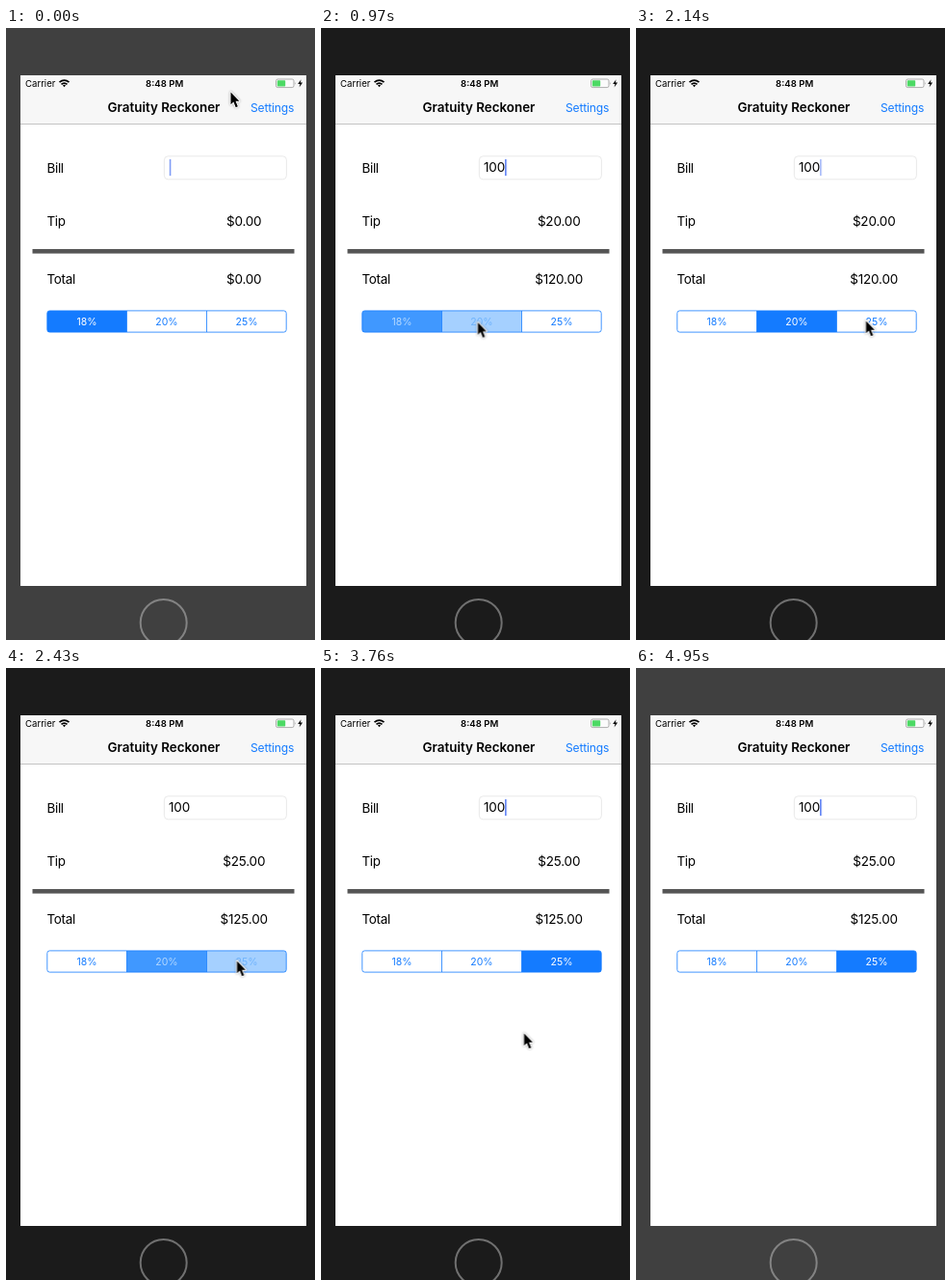
Animation, 321 px wide and 634 px high, one loop 5050 ms. Source, as an HTML page:

```html
<!DOCTYPE html>
<html lang="en">
<head>
<meta charset="utf-8">
<title>Tip calculator</title>
<style>
  html, body { margin: 0; width: 100%; height: 100%; overflow: hidden; background: #1b1b1b; }
  svg { display: block; width: 100vw; height: 100vh; }
  text { font-family: Inter, Roboto, sans-serif; font-size: 13.4px; letter-spacing: -.3px; fill: #000; }
  .mid { text-anchor: middle; }
  .title { font-size: 13.4px; font-weight: 600; letter-spacing: 0; }
  .status { font-size: 9.6px; letter-spacing: 0; }
  .clock { font-weight: 600; }
  .amount, .amounts text { font-size: 13.5px; letter-spacing: -.17px; }
  .link { font-size: 12.1px; letter-spacing: -.18px; fill: #147bff; }
  .segments text { font-size: 10.5px; letter-spacing: 0; fill: #147bff; }
  .segments rect { fill: transparent; }

  /* Every change is a hard step on one shared 5050 ms loop. */
  .anim, .segments rect, .segments text { animation: 5050ms step-end infinite; }

  .bezel { animation-name: bezel; }
  @keyframes bezel { 0%, 98.01% { fill: #404040 } 9.9% { fill: #1b1b1b } }
  .home { animation-name: home; }
  @keyframes home { 0%, 98.01% { stroke: #838383 } 9.9% { stroke: #707070 } }

  .bill { animation-name: bill; }
  @keyframes bill { 0% { opacity: 0 } 9.9% { opacity: 1 } }

  .sum0 { animation-name: sum0; }
  .sum18 { animation-name: sum18; }
  .sum20 { animation-name: sum20; }
  .sum25 { animation-name: sum25; }
  @keyframes sum0 { 0% { opacity: 1 } 9.9% { opacity: 0 } }
  @keyframes sum18 { 0%, 19.2% { opacity: 0 } 9.9% { opacity: 1 } }
  @keyframes sum20 { 0%, 48.11% { opacity: 0 } 19.2% { opacity: 1 } }
  @keyframes sum25 { 0% { opacity: 0 } 48.11% { opacity: 1 } }

  .segments .fill18 { animation-name: fill18; }
  .segments .fill20 { animation-name: fill20; }
  .segments .fill25 { animation-name: fill25; }
  @keyframes fill18 { 0% { fill: #147bff } 19.2% { fill: #4098ff } 21.78% { fill: #fff } }
  @keyframes fill20 {
    0%, 51.08% { fill: #fff }
    19.2% { fill: #a5d0ff }
    21.78% { fill: #147bff }
    48.11% { fill: #4098ff }
  }
  @keyframes fill25 {
    0% { fill: #fff }
    45.14% { fill: #dcebff }
    48.11% { fill: #a5d0ff }
    51.08% { fill: #147bff }
  }

  .segments .label18 { animation-name: label18; }
  .segments .label20 { animation-name: label20; }
  .segments .label25 { animation-name: label25; }
  @keyframes label18 { 0% { fill: #fff } 19.2% { fill: #b4d8ff } 21.78% { fill: #147bff } }
  @keyframes label20 {
    0%, 51.08% { fill: #147bff }
    19.2% { fill: #6fb3fc }
    21.78% { fill: #fff }
    48.11% { fill: #b4d8ff }
  }
  @keyframes label25 { 0% { fill: #147bff } 48.11% { fill: #6fb3fc } 51.08% { fill: #fff } }

  .caret { animation-name: caret-place; }
  @keyframes caret-place { 0% { transform: translate(169.8px, 136px) } 9.9% { transform: translate(191.2px, 136px) } }
  .blink { animation-name: blink; }
  @keyframes blink {
    0% { opacity: .75 }
    24.75%, 42.37%, 51.08%, 62.77%, 71.48%, 83.36% { opacity: .55 }
    9.9%, 27.72%, 45.14%, 65.74%, 86.13% { opacity: 0 }
    19.2%, 33.46%, 54.05%, 74.45%, 92.07% { opacity: 1 }
  }

  .pointer { animation-name: pointer; }
  @keyframes pointer {
    0% { transform: translate(233px, 66px) }
    9.9% { transform: translate(163.5px, 305px) }
    19.2% { transform: translate(162.5px, 304.5px) }
    36.43% { transform: translate(174px, 304.5px) }
    39.4% { transform: translate(220px, 304px) }
    42.37% { transform: translate(238.5px, 303px) }
    45.14% { transform: translate(239.5px, 303px) }
    68.71% { transform: translate(239px, 302.5px) }
    71.48% { transform: translate(236.5px, 304px) }
    74.45% { transform: translate(210.5px, 378px) }
    77.42% { transform: translate(184.5px, 540px) }
    80.39% { transform: translate(180.5px, 578px) }
    86.13% { transform: translate(215px, 598px) }
    89.1% { transform: translate(250px, 620px) }
    92.07% { transform: translate(400px, 700px) }
  }
</style>
</head>
<body>
<svg viewBox="0 0 321 634">
  <defs>
    <clipPath id="pill"><rect x="42.8" y="292.9" width="248.4" height="22.2" rx="2.6"/></clipPath>
  </defs>

  <rect class="anim bezel" width="321" height="634"/>
  <circle class="anim home" cx="163.7" cy="616" r="24" fill="none" stroke-width="2"/>

  <rect x="15" y="49" width="297" height="529" fill="#fff"/>
  <rect x="15" y="49" width="297" height="50" fill="#f7f7f7"/>
  <rect x="15" y="99" width="297" height="1" fill="#c4c4c4"/>

  <!-- Status bar -->
  <text class="status" x="20" y="60.6">Carrier</text>
  <g fill="none" stroke="#000" stroke-width="1.7">
    <path d="M55.5 56.2Q60.5 51.9 65.5 56.2M57.5 58.4Q60.5 55.8 63.5 58.4"/>
    <path d="M59 59.4Q60.5 58.2 62 59.4L60.5 61.2Z" fill="#000" stroke="none"/>
  </g>
  <text class="status clock mid" x="164.7" y="60.6">8:48 PM</text>
  <rect x="280.5" y="53" width="18.5" height="8.6" rx="1.8" fill="#fbfbfb" stroke="#9b9b9b" stroke-width=".8"/>
  <rect x="281.8" y="54.2" width="8.4" height="6.2" rx=".7" fill="#4cd964"/>
  <path d="M300.2 55.9q1.2 1.4 0 2.8z" fill="#9b9b9b"/>
  <path d="M306.6 53.2L303.2 57.9H305.5L304.6 61.4L308.1 56.6H305.8Z"/>

  <text class="title mid" x="164" y="87.2">Gratuity Reckoner</text>
  <text class="link" x="254" y="87">Settings</text>

  <!-- Form -->
  <text x="42.5" y="150">Bill</text>
  <text x="42.5" y="205">Tip</text>
  <text x="42.5" y="265.2">Total</text>
  <rect x="164.4" y="132.8" width="127" height="24" rx="4" fill="#fff" stroke="#e4e4e4" stroke-width=".8"/>
  <text class="amount anim bill" x="169" y="149.2">100</text>
  <g class="anim caret"><rect class="anim blink" width="1.4" height="17" fill="#426bf2"/></g>
  <rect x="27.5" y="229" width="272" height="4.6" fill="#555"/>

  <g class="amounts mid">
    <g class="anim sum0"><text x="247.2" y="205">$0.00</text><text x="247.2" y="265.2">$0.00</text></g>
    <g class="anim sum18"><text x="247.2" y="205">$18.00</text><text x="247.2" y="265.2">$118.00</text></g>
    <g class="anim sum20"><text x="247.2" y="205">$20.00</text><text x="247.2" y="265.2">$120.00</text></g>
    <g class="anim sum25"><text x="247.2" y="205">$25.00</text><text x="247.2" y="265.2">$125.00</text></g>
  </g>

  <g class="segments mid">
    <g clip-path="url(#pill)">
      <rect class="fill18" x="42" y="292" width="83.5" height="24"/>
      <rect class="fill20" x="125.5" y="292" width="83" height="24"/>
      <rect class="fill25" x="208.5" y="292" width="84" height="24"/>
    </g>
    <g fill="none" stroke="#147bff" stroke-width=".8">
      <path d="M125.5 293V315M208.5 293V315"/>
      <rect x="42.8" y="292.9" width="248.4" height="22.2" rx="2.6" style="fill: none; animation: none"/>
    </g>
    <text class="label18" x="84" y="307.6">18%</text>
    <text class="label20" x="167" y="307.6">20%</text>
    <text class="label25" x="250" y="307.6">25%</text>
  </g>

  <g class="anim pointer">
    <path d="M.5 .5V13.2L3.4 10.6L5.7 16.2L7.8 15.3L5.5 9.8H9.4Z" stroke="#fff" stroke-width="2"
          stroke-linejoin="round" paint-order="stroke" style="filter: drop-shadow(0 .7px .8px #0005)"/>
  </g>
</svg>
</body>
</html>
```
